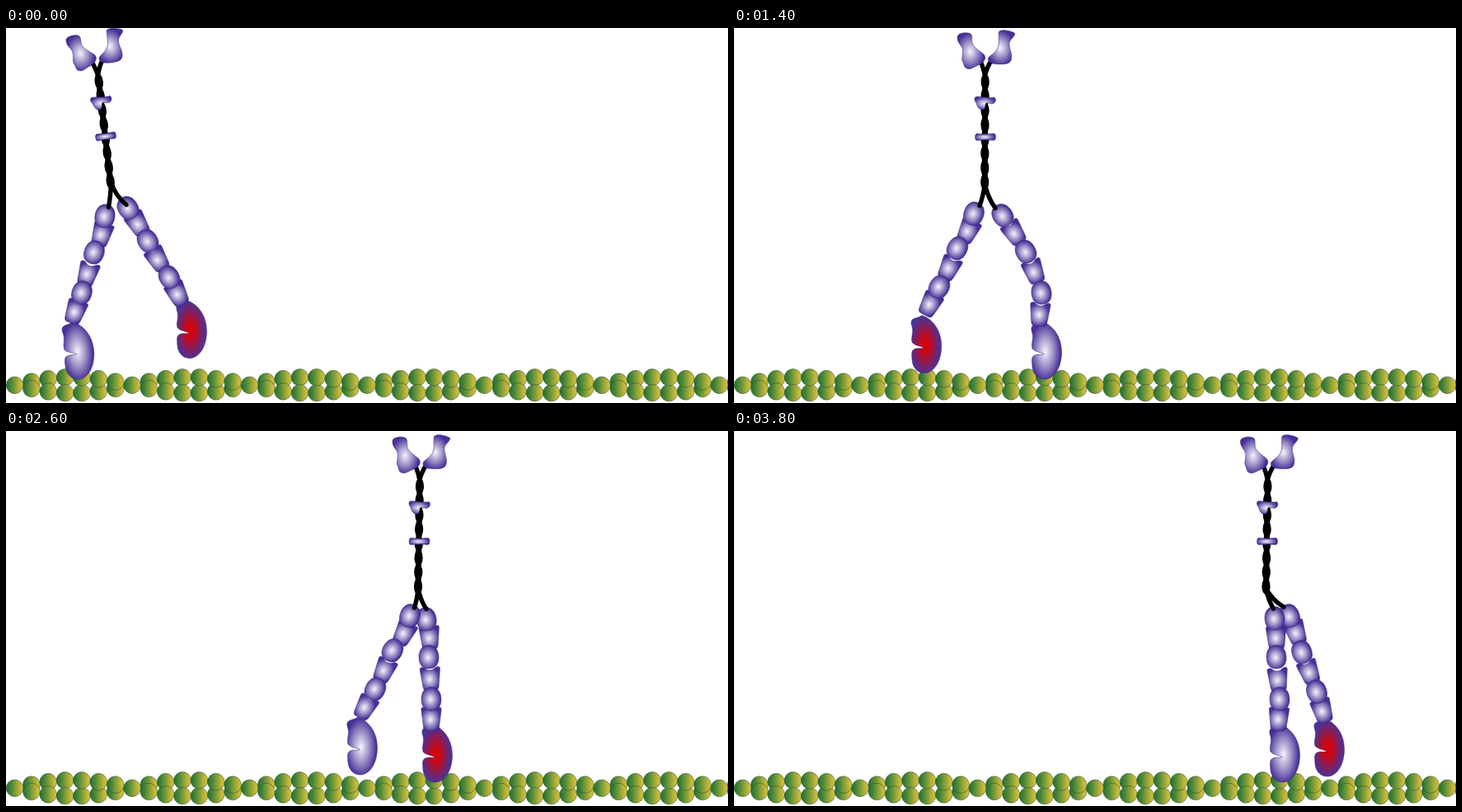
Animation of 876 by 456 pixels, one loop 4 s. Source, as an HTML page:

```html
<!DOCTYPE html>
<html lang="en">
<head>
<meta charset="utf-8">
<title>Walking motor protein</title>
<style>
  html, body { margin: 0; width: 100%; height: 100%; overflow: hidden; background: #fff; }
  svg { display: block; width: 100%; height: 100%; }
  .part { stroke: #35247f; stroke-width: .5; }
  .rope { fill: none; stroke: #000; stroke-width: 5.4; stroke-linecap: round; }
  .ball { fill: url(#ball); stroke: #26431f; stroke-width: .5; }
</style>
</head>
<body>
<svg id="stage" viewBox="0 0 876 456" xmlns="http://www.w3.org/2000/svg">
  <defs>
    <linearGradient id="ball">
      <stop offset="0" stop-color="#1f7036"/>
      <stop offset=".3" stop-color="#4c8837"/>
      <stop offset=".75" stop-color="#b3b03a"/>
      <stop offset="1" stop-color="#dcc73a"/>
    </linearGradient>
    <radialGradient id="white" cx=".46" cy=".52" r=".51">
      <stop offset="0" stop-color="#f6f3fb"/>
      <stop offset=".5" stop-color="#a196ca"/>
      <stop offset="1" stop-color="#482f96"/>
    </radialGradient>
    <radialGradient id="red" cx=".46" cy=".52" r=".51">
      <stop offset="0" stop-color="#d90008"/>
      <stop offset=".25" stop-color="#cc0613"/>
      <stop offset="1" stop-color="#483399"/>
    </radialGradient>
  </defs>
  <g id="track"></g>
  <g id="walker">
    <g id="redLeg"></g>
    <g id="whiteLeg"></g>
    <path id="ropeA" class="rope"/>
    <path id="ropeB" class="rope"/>
    <g id="body">
      <path class="rope" d="M214 61Q212 49 208 41M213.500 61Q216 50 222 41"/>
      <path class="rope" style="stroke-width:7" d="M212 194L214 62"/>
      <g id="coil"></g>
      <g class="part" fill="url(#white)">
        <path d="M181 13C180 8 190 6 196 8C200 10 198 14 199 20C201 26 209 30 213 34C217 39 212 45 205 47C200 49 197 52 193 51C188 50 189 46 187 42C185 38 188 34 187 27C186 22 181 20 181 13Z"/>
        <path d="M232 6C236 3 246 6 250 8C253 11 246 14 244 20C243 27 248 33 246 40C245 46 238 46 232 46C226 46 219 45 218 41C217 36 223 35 227 30C232 24 231 20 231 14C232 10 230 8 232 6Z"/>
        <path d="M202 85.500C207 84 217 88 225 86C228 88 226 94 222 94C218 93.500 215 92 214 94C214 98 213 101 210 101C206 101 204 97 203 93C201 90 200 87 202 85.500Z"/>
        <path d="M203 130Q214 131.500 224 130Q226 130.500 226 134Q226 138 224 138.300Q214 137 203 138.300Q201 138 201 134Q201 130.500 203 130Z"/>
      </g>
    </g>
  </g>
</svg>
<script>
const STEP = 200, STEPS = 20, HALF = 5;
const el = id => document.getElementById(id);

function add(parent, tag, attrs) {
  const node = document.createElementNS("http://www.w3.org/2000/svg", tag);
  for (const key in attrs) node.setAttribute(key, attrs[key]);
  return parent.appendChild(node);
}

// Double helix of balls: two strands crossing every seven balls
for (let i = 0; i < 44; i++) {
  const phase = i % 7, cx = 10.5 + i * 20.355, mid = 434.3;
  const swing = 9.7 * Math.sin(Math.PI * phase / 7);
  const ys = phase === 0 ? [mid] : phase < 4 ? [mid - swing, mid + swing] : [mid + swing, mid - swing];
  for (const cy of ys) add(el("track"), "circle", { class: "ball", cx, cy, r: 10.35 });
}

for (let i = 0; i < 8; i++)
  add(el("coil"), "ellipse", { cx: 212 + i * .28, cy: 189 - i * 17.4, rx: 5.1, ry: 10 });

const EGG = "M0-14.5C8-14.5 12-8 12 0C12 9 8 14 0 14C-8 14-12 9-12 0C-12-8-8-14.500 0-14.5Z";
const CUP = "M-12-10Q-13-14-9-14C-6-14-5-10 0-10C5-10 6-14 10-14Q13-14 12-10L9.5 10Q9 14.500 5 14.5L-5 14.5Q-9 14.500-9.5 10Z";
const FOOT = "M13 0C24 3 37 16 37 37C37 57 27 71 15 70C7 69.500 2 62 1.5 55C1 48 0 43 4 41C8 39 12 41 16 39.5C11 37 5 37 1.5 33C0 28 2 24 2 18C2 13-1 10 1 6C4 2 8 4 13 0Z";

function makeLeg(id, fill) {
  const group = el(id), beads = [];
  const piece = (d, color) => add(group, "path", { class: "part", d, fill: `url(#${color})` });
  const foot = piece(FOOT, fill);
  for (const i of [5, 3, 1]) beads[i] = piece(CUP, "white");
  for (const i of [4, 2, 0]) beads[i] = piece(EGG, "white");
  return { beads, foot };
}
const legs = [makeLeg("whiteLeg", "white"), makeLeg("redLeg", "red")];

// body: hip x, y, tilt; leg: six bead centres; foot: left, top, tilt; end: rope end
// a is the leg that starts behind and swings through, b the one that lands
const start = {
  body: [127.6, 193.3, -7.5],
  a: { beads: [120, 229, 116, 251, 107, 273, 99, 299, 92, 322, 84, 345], foot: [69.5, 357, -4], end: [124.5, 218] },
  b: { beads: [148, 219, 160, 238, 172, 259, 184, 281, 198, 303, 208, 323], foot: [206.5, 331.5, 0], end: [146, 215] }
};
const lift = {
  body: [159.3, 194.3, -.7],
  a: { beads: [146, 226, 139, 247, 126, 268, 116, 292, 104, 315, 93, 336], foot: [69.7, 349.5, 0], end: [153, 216] },
  b: { beads: [181, 228, 195, 249, 209, 272, 219, 296, 228, 322, 226, 348], foot: [215.5, 357, 0], end: [172, 219] }
};
const swing = {
  body: [212, 196, 0],
  a: { beads: [202, 225, 195, 246, 181, 267, 171, 291, 160, 314, 148, 336], foot: [125.5, 348, 0], end: [207.5, 215] },
  b: { beads: [222, 229, 226, 251, 225, 275, 227, 301, 228, 326, 228, 350], foot: [216.5, 357, 0], end: [222, 216.5] }
};
const pass = {
  body: [212.5, 196, 0],
  a: { beads: [241, 225, 249, 245, 256, 269, 265, 293, 274, 317, 281, 340], foot: [270.5, 350, 0], end: [234, 214] },
  b: { beads: [223, 228, 225, 251, 225, 275, 227, 302, 229, 326, 228, 350], foot: [216.5, 357, 0], end: [221.5, 216] }
};

// Both feet planted: hips halfway, feet at their ground positions
const mix = (p, q, weight) => p.map((v, i) => v + (q[i] - v) * weight(i));
const half = () => .5;
function blendLeg(p, q, toe) {
  return {
    beads: mix(p.beads, q.beads, i => .5 + (toe - .5) * Math.floor(i / 2) / 6),
    foot: mix(p.foot, q.foot, () => toe),
    end: mix(p.end, q.end, half)
  };
}
const land = {
  body: mix(start.body, lift.body, half),
  a: blendLeg(start.a, lift.a, 0),
  b: blendLeg(start.b, lift.b, 1)
};
const poses = [start, land, lift, swing, pass];

const place = (node, x, y, turn, pivot = "") =>
  node.setAttribute("transform", `translate(${x} ${y}) rotate(${turn}${pivot})`);

function poseLeg(leg, { beads: p, foot }) {
  leg.beads.forEach((bead, i) => {
    const from = 2 * Math.max(i - 1, 0), to = 2 * Math.min(i + 1, 5);
    const turn = Math.atan2(p[to + 1] - p[from + 1], p[to] - p[from]) * 180 / Math.PI - 90;
    place(bead, p[2 * i], p[2 * i + 1], turn);
  });
  place(leg.foot, ...foot, " 18 35");
}

function poseRope(id, [x, y], [ex, ey]) {
  const cx = x + (ex - x) * .3, cy = y + (ey - y) * .5;
  el(id).setAttribute("d", `M${x} ${y - 5}Q${cx} ${cy} ${ex} ${ey}`);
}

function show(step) {
  const stride = Math.floor(step / HALF), odd = stride % 2;
  const { body, a, b } = poses[step % HALF];
  const shift = (stride - odd) * 144 + odd * 145;
  el("walker").setAttribute("transform", `translate(${shift} 0)`);
  poseLeg(legs[odd], a);
  poseLeg(legs[1 - odd], b);
  poseRope("ropeA", body, a.end);
  poseRope("ropeB", body, b.end);
  el("body").setAttribute("transform",
    `translate(${body[0]} ${body[1]}) rotate(${body[2]}) translate(-212 -196)`);
}

let last = -1;
function tick() {
  const step = Math.floor(performance.now() / STEP) % STEPS;
  if (step !== last) show(last = step);
  requestAnimationFrame(tick);
}
tick();
</script>
</body>
</html>
```
